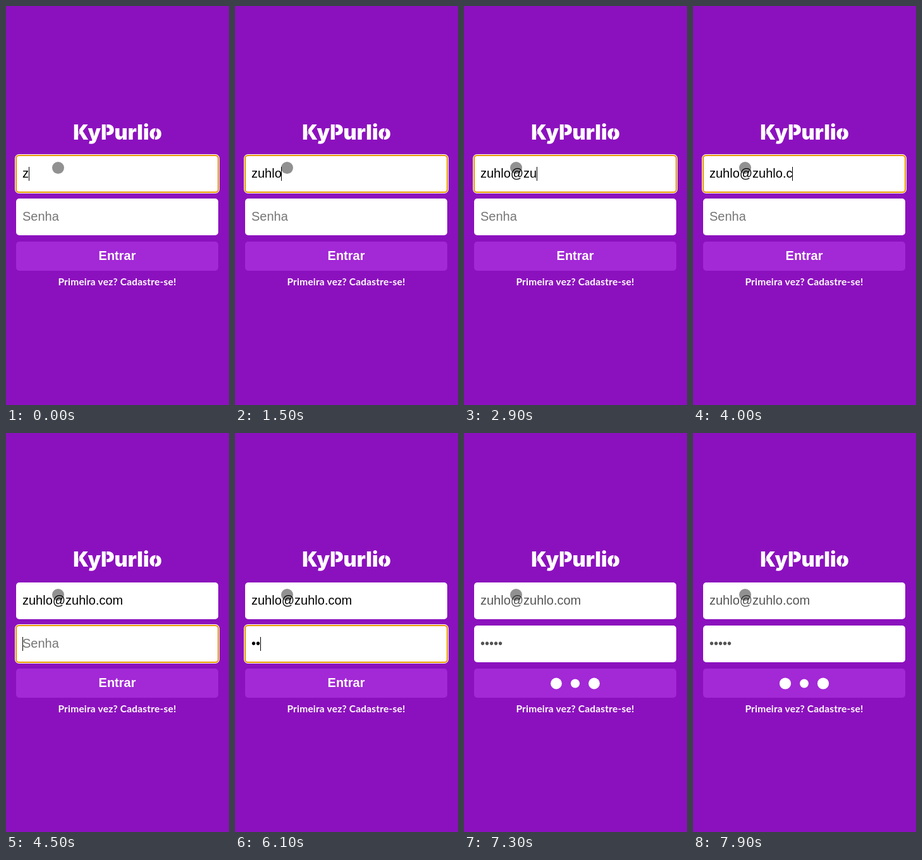
An HTML page that plays this animation: 353 px wide and 630 px high, repeating every 8 s.

```html
<!DOCTYPE html>
<html lang="pt-BR">
<head>
<meta charset="utf-8">
<title>Entrar</title>
<style>
  html, body { margin: 0; width: 100%; height: 100%; overflow: hidden; background: #8c11be; }
  svg { display: block; }
  text { white-space: pre; }
  .field { font: 20px "Liberation Sans", Arial, sans-serif; }
  .title { font: 900 32.5px Inter, Roboto, sans-serif; fill: #fff; text-anchor: middle; }
  .button { font: bold 20px "Liberation Sans", Arial, sans-serif; fill: #fff; text-anchor: middle; }
  .link { font: 700 15.5px Lato, "Open Sans", sans-serif; letter-spacing: .2px; fill: #fff; text-anchor: middle; }
</style>
</head>
<body>
<svg width="353" height="630" viewBox="0 0 353 630">
  <rect width="353" height="630" fill="#8c11be"/>
  <text class="title" id="title" x="176.5" y="211">KyPurlio</text>
  <g id="slits" stroke="#8c11be" stroke-width="1.5"></g>

  <rect x="16" y="236" width="320" height="58" rx="5" fill="#fff"/>
  <rect x="16" y="304" width="320" height="58" rx="5" fill="#fff"/>
  <g id="ring">
    <rect x="14" y="234" width="324" height="62" rx="6.5" fill="#fff"/>
    <rect x="16" y="236" width="320" height="58" rx="4.5" fill="#fff" stroke="#e59700" stroke-width="2"/>
  </g>
  <text class="field" id="email" x="26" y="271"></text>
  <text class="field" id="pass" x="26" y="339"></text>
  <rect id="caret" width="1" height="22"/>

  <rect x="16" y="372" width="320" height="46" rx="5" fill="#a328d6"/>
  <text class="button" id="label" x="176" y="401">Entrar</text>
  <g id="dots" fill="#fff">
    <circle cx="146" cy="395.5"/>
    <circle cx="176" cy="395.5"/>
    <circle cx="206" cy="395.5"/>
  </g>
  <text class="link" x="176" y="441">Primeira vez? Cadastre-se!</text>
  <circle id="pointer" cx="82.5" cy="255.5" r="9.5"/>
</svg>
<script>
const LOOP = 8000;
const ADDRESS = "zuhlo@zuhlo.com";
const EMAIL_KEYS = [0, 200, 1000, 1200, 1500, 2000, 2600, 2900, 3000, 3200, 3300, 3800, 4000, 4100, 4200];
const PASS_KEYS = [5200, 6100, 6400, 6600, 6800];
const SHIFT_DOWN = 1700, SHIFT_UP = 2200;
const TAB = 4500, SEND = 7300;

const $ = id => document.getElementById(id);
const [email, pass, caret, ring, label, dots, pointer] =
  ["email", "pass", "caret", "ring", "label", "dots", "pointer"].map($);

const set = (el, attrs) => {
  for (const name in attrs) el.setAttribute(name, attrs[name]);
};
const show = (el, on) => set(el, { visibility: on ? "visible" : "hidden" });
const typed = (keys, t) => keys.filter(k => k <= t).length;

function write(el, text, fill) {
  if (el.textContent !== text) el.textContent = text;
  set(el, { fill });
}

// Narrow cuts give the heading its stencil look.
function cutTitle() {
  const cuts = [[0, 0.39, 0], [2, 0.39, 0], [7, 0.5, 2]];
  for (const [index, part, slant] of cuts) {
    const box = $("title").getExtentOfChar(index);
    const x = box.x + box.width * part;
    const line = document.createElementNS("http://www.w3.org/2000/svg", "line");
    set(line, { x1: x + slant, y1: 186, x2: x - slant, y2: 213 });
    $("slits").append(line);
  }
}

// The outer dots shrink while the middle one grows, in 100 ms steps.
function drawLoader(t) {
  const phase = (Math.floor((t - SEND) / 100) * 100 + 110) % 800;
  const swing = 4 * (1 - Math.abs(phase / 400 - 1));
  [...dots.children].forEach((dot, i) => set(dot, { r: i === 1 ? 6 + swing : 10 - swing }));
}

function draw(t) {
  const sending = t >= SEND;
  const inPass = t >= TAB;
  const count = typed(PASS_KEYS, t);
  const ink = sending ? "#545454" : "#000";

  write(email, ADDRESS.slice(0, typed(EMAIL_KEYS, t)), ink);
  write(pass, count ? "•".repeat(count) : "Senha", count ? ink : "#757575");

  const shift = inPass ? 68 : 0;
  const width = inPass && !count ? 0 : (inPass ? pass : email).getComputedTextLength();
  set(ring, { transform: `translate(0 ${shift})` });
  set(caret, { x: Math.floor(26 + width + 0.01), y: 254 + shift });

  show(ring, !sending);
  show(caret, !sending);
  show(label, !sending);
  show(dots, sending);
  if (sending) drawLoader(t);

  const pinch = t >= SHIFT_DOWN && t < SHIFT_UP;
  set(pointer, { "fill-opacity": pinch ? 0.32 : 0.43 });
}

cutTitle();
const start = performance.now();
function tick() {
  draw((performance.now() - start) % LOOP);
  requestAnimationFrame(tick);
}
tick();
</script>
</body>
</html>
```
